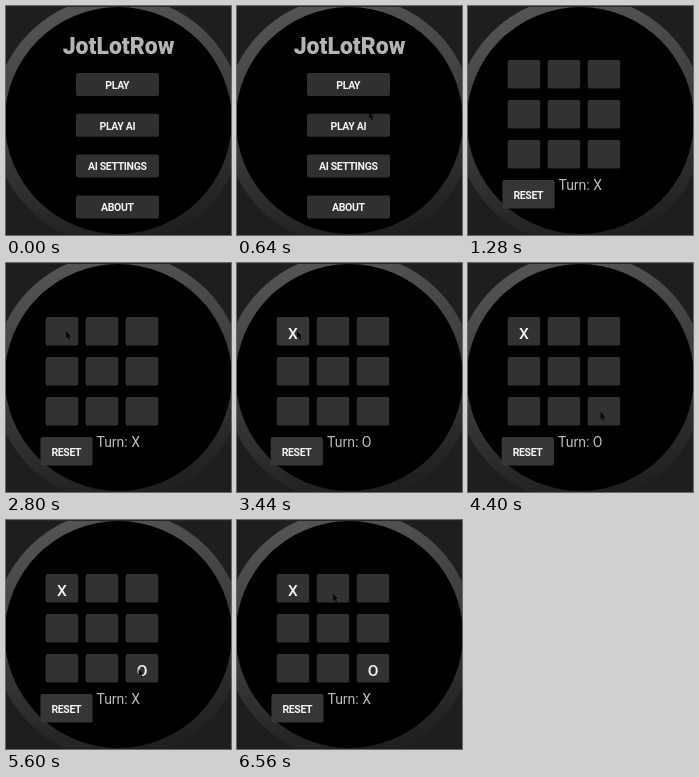
Recreate the animation shown at these times as an HTML page. Size 225 by 229 pixels, loop 7.04 s.

```html
<!DOCTYPE html>
<html lang="en">
<head>
<meta charset="utf-8">
<title>Watch game</title>
<style>
  html, body { margin: 0; width: 100%; height: 100%; overflow: hidden; background: #1e1e1e; }
  svg { display: block; width: 100vw; height: 100vh; }
  text { font-family: Roboto, sans-serif; text-anchor: middle; fill: #f4f4f4; }
  .label { font-size: 10.5px; font-weight: 600; letter-spacing: -0.35px; }
  .title { font-size: 23px; font-weight: 900; fill: #b4b4b4; }
  .turn { font-size: 14px; fill: #bcbcbc; }
  .mark { font-size: 15.5px; font-weight: 500; }
</style>
</head>
<body>
<svg viewBox="0 0 225 229" preserveAspectRatio="none">
  <defs>
    <linearGradient id="rim" x1="0.35" y1="0" x2="0.55" y2="1">
      <stop offset="0" stop-color="#565656"/>
      <stop offset="0.5" stop-color="#3c3c3c"/>
      <stop offset="0.85" stop-color="#262626"/>
      <stop offset="1" stop-color="#1e1e1e"/>
    </linearGradient>
    <clipPath id="playClip"><rect x="70" y="67" width="83" height="23" rx="2"/></clipPath>
  </defs>
  <rect width="225" height="229" fill="#1e1e1e"/>
  <rect y="228" width="225" height="1" fill="#241a1b"/>
  <circle cx="112" cy="115" r="125" fill="url(#rim)"/>
  <circle cx="112.3" cy="114.5" r="113.5" fill="#000"/>
  <rect width="225" height="1" fill="#262626"/>
  <g id="menu">
    <text class="title" x="112.5" y="48">JotLotRow</text>
  </g>
  <g id="game">
    <g id="cells"></g>
    <text class="mark" id="markX" x="56" y="76">X</text>
    <text class="mark" id="markO" x="136" y="155.5">O</text>
    <text class="turn" id="turn" x="112.2" y="184"></text>
    <g id="reset">
      <rect x="34.4" y="174" width="52.2" height="28.5" rx="2" fill="#363636"/>
      <text class="label" x="60.3" y="193">RESET</text>
    </g>
  </g>
  <path id="cursor" d="M0 0V7.2L1.6 5.8L2.9 8.8L4 8.3L2.8 5.4H5Z" fill="#080808"/>
</svg>
<script>
const LOOP = 7040, STEP = 80, GAME_START = 1280;
const $ = id => document.getElementById(id);

function add(parent, tag, attrs, content = '') {
  const node = document.createElementNS('http://www.w3.org/2000/svg', tag);
  for (const key in attrs) node.setAttribute(key, attrs[key]);
  node.textContent = content;
  parent.appendChild(node);
  return node;
}

let playRipple;
['PLAY', 'PLAY AI', 'AI SETTINGS', 'ABOUT'].forEach((label, i) => {
  const y = 67 + i * 40.8;
  add($('menu'), 'rect', { x: 70, y, width: 83, height: 23, rx: 2, fill: '#303030' });
  if (i === 0) {
    playRipple = add($('menu'), 'circle',
      { cx: 114, cy: 78, r: 28.5, fill: '#393939', 'clip-path': 'url(#playClip)' });
  }
  add($('menu'), 'text', { class: 'label', x: 111.3, y: y + 15.8 }, label);
});

const cells = Array.from({ length: 9 }, (_, i) => add($('cells'), 'rect', {
  x: 39.7 + i % 3 * 40, y: 54 + Math.floor(i / 3) * 40, width: 32.5, height: 28.6, rx: 2
}));

// Each move: start and end time, start and end position of the pointer tip.
const moves = [
  [240, 400, 217, 211, 141, 120],
  [560, 800, 138, 116, 115, 76],
  [2000, 2400, 100, 76, 60, 68],
  [3760, 4240, 60, 68, 132.5, 149],
  [5840, 6160, 132.5, 149, 104, 113],
  [6160, 6560, 104, 113, 96, 73.5]
];

function pointerAt(t) {
  const move = moves.filter(m => t >= m[0]).pop();
  if (!move) return null;
  const [start, end, x0, y0, x1, y1] = move;
  const p = Math.min(1, (t - start) / (end - start));
  const eased = p * p * (3 - 2 * p);
  return [x0 + (x1 - x0) * eased, y0 + (y1 - y0) * eased];
}

// Brightness of a pressed cell, fading out after the click.
function press(t, start) {
  const p = (t - start) / 320;
  return p >= 0 && p < 1 ? 1 - p : 0;
}

const show = (node, visible) => node.setAttribute('visibility', visible ? 'visible' : 'hidden');

function render(time) {
  const t = Math.floor(time % LOOP / STEP) * STEP;
  const playing = t >= GAME_START;
  const hasX = t >= 3280, hasO = t >= 5360;
  const turnO = hasX && !hasO;

  $('menu').style.display = playing ? 'none' : '';
  $('game').style.display = playing ? '' : 'none';
  show(playRipple, !playing && t >= 1200);

  if (playing) {
    show($('markX'), hasX);
    show($('markO'), hasO);
    $('turn').textContent = 'Turn: ' + (turnO ? 'O' : 'X');
    $('reset').setAttribute('transform', `translate(${turnO ? -0.7 : 0} 0)`);
    cells.forEach((cell, i) => {
      const glow = i === 0 ? press(t, 3200) : i === 8 ? press(t, 5280) : 0;
      const tone = Math.round(50 + 16 * glow);
      cell.setAttribute('fill', `rgb(${tone},${tone},${tone})`);
    });
  }

  const tip = pointerAt(t);
  show($('cursor'), tip);
  if (tip) $('cursor').setAttribute('transform', `translate(${tip})`);
}

const origin = performance.now();
function tick() {
  render(performance.now() - origin);
  requestAnimationFrame(tick);
}
tick();
</script>
</body>
</html>
```
